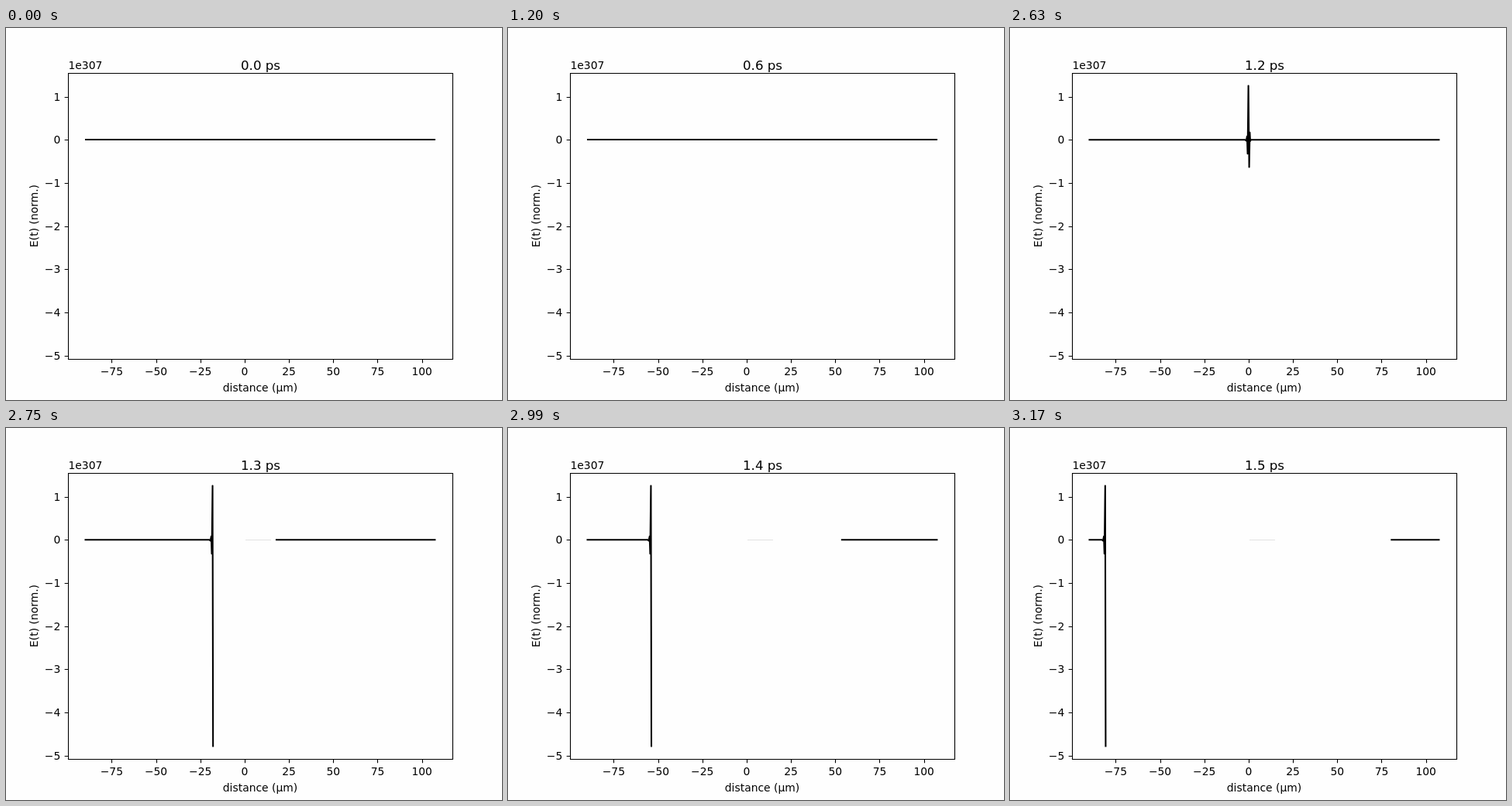
Recreate the animation shown at these times as an HTML page. Size 640 by 480 pixels, loop 3200 ms.

```html
<!DOCTYPE html>
<html lang="en">
<head>
<meta charset="utf-8">
<title>Field over distance</title>
<style>
  html, body { margin: 0; width: 100%; height: 100%; overflow: hidden; background: #fefefe; }
  svg { display: block; }
  text { font: 13.89px "DejaVu Sans", sans-serif; fill: #000; white-space: pre; }
  #title { font-size: 16.67px; }
  .mid { text-anchor: middle; }
  .end { text-anchor: end; }
  .axis { fill: none; stroke: #000; stroke-width: 1.11; }
  .slab { stroke: #e2e2e2; }
  #wave { fill: none; stroke: #000; stroke-width: 2.083; stroke-linecap: square; stroke-linejoin: round; }
</style>
</head>
<body>
<svg width="640" height="480" viewBox="0 0 640 480">
  <path class="slab" d="M309 144.5H342"/>
  <path id="wave"/>
  <path class="axis" d="M80.5 58.5H576.5V427.5H80.5Z"/>
  <path class="axis" id="ticks"/>
  <g id="labels"></g>
  <text x="80.5" y="53">1e307</text>
  <text id="title" x="303" y="54">0.0 ps</text>
  <text class="mid" x="328" y="469">distance (µm)</text>
  <text class="mid" transform="translate(41 242.5) rotate(-90)">E(t) (norm.)</text>
</svg>
<script>
  const LOOP = 3200, BURST = 2630, STEP = 30, SHIFT = 10.265;
  const LEFT = 102.5, RIGHT = 553.45, CENTER = 308, ZERO = 144.3;
  const titleTimes = [130, 320, 550, 780, 1010, 1200, 1430, 1620, 1850,
                      2080, 2310, 2500, 2720, 2900, 3110];
  // Offsets from the pulse edge, with heights in units of 1e307
  const rise = [[-4.4, 0], [-3.4, -0.02], [-2.8, 0.02], [-2.1, 0.08], [-1.4, -0.32], [-0.4, 1.255]];
  const ringing = [[0.6, -0.63], [1.4, 0.17], [2, -0.03], [2.6, 0]];
  const blowUp = [[0.2, -4.78]];

  const $ = id => document.getElementById(id);
  const px = um => 307.9 + um * 2.2875;
  const py = e => ZERO - e * 55.68;
  const snap = v => Math.floor(v + 0.5) + 0.5;
  const number = v => String(v).replace("-", "\u2212");

  function label(text, x, y, cls) {
    const el = document.createElementNS("http://www.w3.org/2000/svg", "text");
    el.setAttribute("x", x);
    el.setAttribute("y", y);
    el.setAttribute("class", cls);
    el.textContent = number(text);
    $("labels").append(el);
  }

  function drawAxes() {
    let d = "";
    for (let um = -75; um <= 100; um += 25) {
      d += `M${snap(px(um))} 427.5v4.86`;
      label(um, px(um), 448, "mid");
    }
    for (let e = -5; e <= 1; e++) {
      d += `M80.5 ${snap(py(e))}h-4.86`;
      label(e, 70.3, Math.round(py(e) + 5), "end");
    }
    $("ticks").setAttribute("d", d);
  }

  function wavePath(t) {
    if (t < BURST) return "M103 144H553";
    const n = Math.floor((t - BURST) / STEP);
    const edge = CENTER - SHIFT * n;
    const pulse = rise.concat(n ? blowUp : ringing)
      .map(([dx, e]) => `L${edge + dx} ${py(e)}`).join("");
    const rest = n ? `M${CENTER + 10.24 * n} ${ZERO}` : "";
    return `M${LEFT} ${ZERO}${pulse}${rest}H${RIGHT}`;
  }

  function draw(now) {
    const t = now % LOOP;
    const tenths = titleTimes.filter(at => t >= at).length;
    $("title").textContent = (tenths / 10).toFixed(1) + " ps";
    $("wave").setAttribute("d", wavePath(t));
  }

  let start;
  function tick(now) {
    start ??= now;
    draw(now - start);
    requestAnimationFrame(tick);
  }

  drawAxes();
  draw(0);
  requestAnimationFrame(tick);
</script>
</body>
</html>
```
